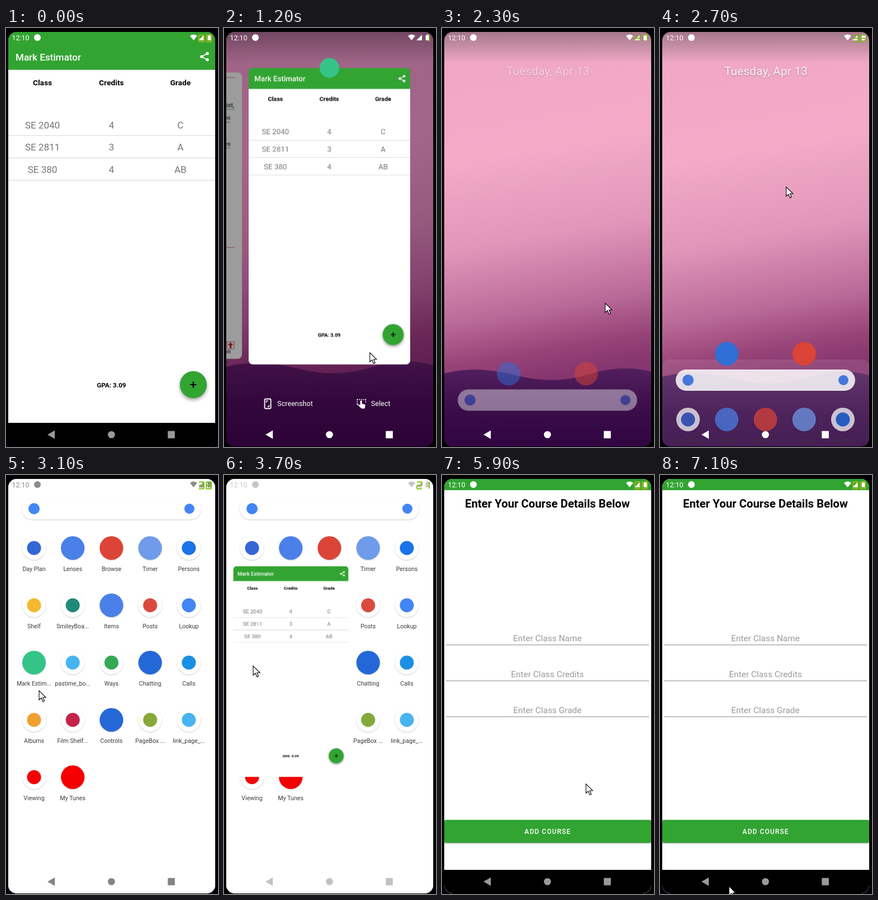
An HTML page that plays this animation: 378x746 px, repeating every 7.2 s.

```html
<!DOCTYPE html>
<html lang="en">
<head>
<meta charset="utf-8">
<title>Grade list</title>
<style>
  html, body { margin: 0; height: 100%; overflow: hidden; background: #000; }
  svg { display: block; width: 378px; height: 746px; }
  text { font-family: Roboto, sans-serif; white-space: pre; }
  .mid { text-anchor: middle; }
  .bold { font-weight: 700; }
  .row { font-size: 17px; fill: #757575; }
  .head { font-size: 13.7px; }
  .hint { font-size: 15.4px; fill: #9a9a9a; }
  .link { font-size: 11px; font-weight: 500; fill: #3a3a3a; }
  .para { font-size: 10.7px; font-weight: 500; fill: #3a3a3a; }
  .act { font-size: 12.6px; fill: #fff; }
  .app { font-size: 10.6px; fill: #3c3c3c; }
  .soft { filter: drop-shadow(0 1px 1px #0005); }
  .faint { filter: drop-shadow(0 1px 1px #0003); }
  .lift { filter: drop-shadow(0 3px 3px #0006); }
</style>
</head>
<body>
<svg viewBox="0 0 378 746">
  <defs>
    <linearGradient id="sky" gradientUnits="userSpaceOnUse" x1="110" y1="0" x2="215" y2="620">
      <stop offset="0" stop-color="#eea6c4"/>
      <stop offset=".35" stop-color="#f3abc8"/>
      <stop offset=".6" stop-color="#e096b9"/>
      <stop offset=".8" stop-color="#ba6a98"/>
      <stop offset=".92" stop-color="#974378"/>
      <stop offset="1" stop-color="#85366e"/>
    </linearGradient>
    <linearGradient id="hill" x2="0" y2="1">
      <stop offset="0" stop-color="#521f5e"/>
      <stop offset=".5" stop-color="#3a0c4a"/>
      <stop offset="1" stop-color="#2f0440"/>
    </linearGradient>
    <linearGradient id="shade" x2="0" y2="1">
      <stop offset="0" stop-color="#333" stop-opacity=".4"/>
      <stop offset="1" stop-color="#333" stop-opacity="0"/>
    </linearGradient>
    <clipPath id="screen"><rect x="4" y="7" width="369" height="738" rx="15"/></clipPath>
    <clipPath id="body"><rect x="4" y="27" width="369" height="676" rx="9"/></clipPath>
    <clipPath id="card"><rect x="44" y="71" width="288" height="526" rx="8"/></clipPath>
  </defs>

  <g clip-path="url(#screen)">
    <path d="M0 0H378V746H0Z" fill="url(#sky)"/>
    <path id="hills" d="M4 603Q60 588 130 606T260 605T373 600V746H4Z" fill="url(#hill)"/>
    <path d="M0 7H378V62H0Z" fill="url(#shade)"/>

    <g id="home">
      <text class="mid soft" x="189" y="84" font-size="20.6" letter-spacing=".25" fill="#fff" opacity=".9">Tuesday, Apr 13</text>
    </g>
    <path id="white" d="M0 0H378V746H0Z" fill="#fff"/>
    <g id="drawer">
      <rect id="sheet" x="4" y="23" width="369" height="760" rx="12" fill="#fff"/>
      <g id="dock">
        <circle cx="119" cy="13" r="21" fill="#2f6fd6"/>
        <circle cx="257" cy="13" r="21" fill="#db4437"/>
      </g>
      <g id="bar">
        <rect class="faint" x="28" y="41" width="320" height="38" rx="19" fill="#fff"/>
        <circle cx="50" cy="60" r="10" fill="#4285f4"/>
        <circle cx="327" cy="60" r="9" fill="#4285f4"/>
      </g>
      <g id="grid"></g>
    </g>

    <g id="recents">
      <path d="M0 0H378V746H0Z" fill="#280028" opacity=".4"/>
      <g id="third" clip-path="url(#card)">
        <path d="M44 71H332V597H44Z" fill="#fff"/>
        <path d="M44 190H332M44 248H332" stroke="#ccc"/>
        <g fill="none" stroke="#222" stroke-width="1.7"><circle cx="314" cy="87" r="3.8"/><path d="M317 90l5 5"/></g>
        <path d="M44 71H332V597H44Z" opacity=".39"/>
      </g>
      <g id="page" clip-path="url(#card)">
        <path d="M44 71H332V597H44Z" fill="#fff"/>
        <path d="M57 80.5H319M57 392.5H319" stroke="#d9777c"/>
        <g id="links"></g>
        <text x="57" y="432" font-size="20" font-weight="800" fill="#c5111b" style="font-family:Inter,sans-serif">Bureau of Learning</text>
        <g font-style="italic">
          <text class="para" x="57" y="465">Main Office: Meadow Annexe, MA-135</text>
          <text class="para" x="57" y="488">Voice: (300) 555-0142</text>
        </g>
        <text class="para" x="57" y="518">The regulations and policies of KZWU include only</text>
        <text class="para" x="57" y="541">those that are necessary to the proper organization</text>
        <text class="para" x="57" y="564">and operation of the university. KZWU reserves the</text>
        <text class="para" x="57" y="587">right to change the rules governing admission, tuition</text>
        <path d="M304.500 565.500h13v14h-13Z" fill="#fff" stroke="#c9666b"/>
        <path d="M311 567l5 5h-3.500v6h-3v-6h-3.500Z" fill="#c5111b"/>
        <path id="dim" d="M44 71H332V597H44Z" opacity=".39"/>
      </g>
      <g fill="none" stroke="#fff" stroke-width="1.8">
        <rect x="72.500" y="660.500" width="11" height="17" rx="1.500"/>
        <path d="M75.500 667v-3h3M80.500 671v3h-3" stroke-width="1.300"/>
        <path d="M237 661.500H253M237 670.500H241M237.500 661V671M252.500 661V667" stroke-dasharray="2 1.500" stroke-width="1.500"/>
      </g>
      <path d="M243 664q1.500-1.500 3 0v5l6 1.500-1 7h-6l-6-6 1-1 3 1Z" fill="#fff"/>
      <text class="act" x="95" y="673">Screenshot</text>
      <text class="act" x="262" y="673">Select</text>
    </g>

    <g id="bars">
      <path d="M0 0H378V40H0Z" fill="#32a432"/>
      <path d="M0 680H378V703H0Z" fill="#fff"/>
      <path d="M0 703H378V746H0Z"/>
    </g>
    <g id="win">
      <g clip-path="url(#body)">
        <path d="M4 27H373V703H4Z" fill="#fff"/>
        <path d="M4 27H373V74.500H4Z" fill="#32a432"/>
        <text x="17" y="57.500" font-size="17" font-weight="500" fill="#fff">Mark Estimator</text>
        <path d="M359 45.500L349 51L359 56.500" fill="none" stroke="#fff" stroke-width="1.700"/>
        <g fill="#fff"><circle cx="359" cy="45.500" r="2.700"/><circle cx="349" cy="51" r="2.700"/><circle cx="359" cy="56.500" r="2.700"/></g>
        <g id="table"></g>
        <text class="mid bold" x="188" y="640" font-size="11.700">GPA: 3.09</text>
        <circle class="lift" cx="334" cy="635" r="24" fill="#32a432"/>
        <path d="M328.500 635h11M334 629.500v11" stroke="#000" stroke-width="2.200"/>
      </g>
    </g>
    <circle id="badge" cx="188" cy="71" r="17.500" fill="#35c487"/>
    <circle id="badge2" cx="188" cy="71" r="18.500" fill="#db4437"/>

    <g id="add">
      <path d="M4 27H373V703H4Z" fill="#fff"/>
      <text class="mid bold" x="188" y="57.500" font-size="20.300">Enter Your Course Details Below</text>
      <text class="mid hint" x="188" y="296">Enter Class Name</text>
      <text class="mid hint" x="188" y="360">Enter Class Credits</text>
      <text class="mid hint" x="188" y="424">Enter Class Grade</text>
      <path d="M7 302.500H369M7 366.500H369M7 430.500H369" stroke="#8c8c8c"/>
      <rect class="soft" x="4" y="614" width="369" height="41" rx="3" fill="#32a432"/>
      <text class="mid" x="188.500" y="639" font-size="12" font-weight="500" letter-spacing="1.070" fill="#fff">ADD COURSE</text>
    </g>

    <g id="status" fill="currentColor">
      <text x="10.500" y="21.500" font-size="12.500">12:10</text>
      <circle cx="56" cy="17" r="6"/>
      <path d="M328 14q6.500-5 13 0l-6.500 8ZM343 22l10-10v10ZM359.500 13h2v-1.500h3v1.500h2v9h-7Z"/>
    </g>
    <g id="fps" fill="none" stroke-width="1.800"></g>
    <g id="nav" fill="currentColor">
      <path d="M74 724l13-7.500v15ZM288.500 717.500h12.500v13h-12.500Z"/>
      <circle cx="188" cy="724" r="6.300"/>
    </g>
  </g>
  <path id="cursor" d="M0 0V16.500L4 13L6.800 19.500L9.500 18.300L6.800 12H12Z" fill="#fff" stroke="#000" stroke-width="1.100"/>
</svg>

<script>
const LOOP = 7200, TICK = 100;
const $ = id => document.getElementById(id);
const fill = (id, html) => $(id).insertAdjacentHTML('beforeend', html);

// Table of courses
const cols = [65, 188, 311];
const cells = (list, y, cls) => list.map((s, i) =>
  `<text class="mid ${cls}" x="${cols[i]}" y="${y}">${s}</text>`).join('');
fill('table', cells(['Class', 'Credits', 'Grade'], 102, 'bold head'));
[['SE 2040', 4, 'C'], ['SE 2811', 3, 'A'], ['SE 380', 4, 'AB']].forEach((r, i) => {
  const y = 178.5 + i * 39.8;
  fill('table', cells(r, y, 'row') +
    `<path d="M4 ${y + 13}H373" stroke="#dadada" stroke-width="1.2"/>`);
});

// Link columns; a leading star starts a bullet
const linkColumn = (x, lines) => lines.forEach((line, i) => {
  const y = 111 + i * 23.75, text = line.replace('*', '');
  if (line[0] === '*') fill('links', `<circle cx="${x - 7}" cy="${y - 4}" r="1.8" fill="#333"/>`);
  fill('links', `<text class="link" x="${x}" y="${y}">${text}</text>`);
  const w = $('links').lastElementChild.getComputedTextLength();
  fill('links', `<path d="M${x} ${y + 4}h${w}" stroke="${i % 3 ? '#4f9fc4' : '#58b59c'}"/>`);
});
linkColumn(77, ['*Student Integrity', '*Student Complaint', 'Policy and', 'Procedures',
  '*Research with Hu-', 'man Participants', '*General Academic', 'Policies',
  '*Transfer Credit', '*Registration and', 'Course-Related', 'Policies']);
linkColumn(200, ['*Grades and Grading', '*Dean’s List, Honor’s List,', 'Probation, Suspension',
  '*Graduation Require-', 'ments and Procedures', '*Minors', '*Certificates']);

// Launcher grid: label, colour, and 1 for a fully coloured disc
[['Day Plan', '#3367d6'], ['Lenses', '#4a80e8', 1], ['Browse', '#db4437', 1], ['Timer', '#6f9bea', 1], ['Persons', '#1a73e8'],
 ['Shelf', '#f4b92e'], ['SmileyBoa...', '#1f8a78'], ['Items', '#4a80e8', 1], ['Posts', '#d94a3d'], ['Lookup', '#4285f4'],
 ['Mark Estim...', '#35c487', 1], ['pastime_bo...', '#47b4f0'], ['Ways', '#34a853'], ['Chatting', '#2468d8', 1], ['Calls', '#1a8fe3'],
 ['Albums', '#f0a030'], ['Film Shelf...', '#c2244b'], ['Controls', '#2468d8', 1], ['PageBox ...', '#86a83a'], ['link_page_...', '#47b4f0'],
 ['Viewing', '#f40000'], ['My Tunes', '#f40000', 1]
].forEach(([label, color, full], i) => {
  const x = 50 + i % 5 * 69, y = 130 + Math.floor(i / 5) * 102;
  fill('grid', `<circle class="faint" cx="${x}" cy="${y}" r="21" fill="${full ? color : '#fff'}"/>` +
    (full ? '' : `<circle cx="${x}" cy="${y}" r="12.5" fill="${color}"/>`) +
    `<text class="mid app" x="${x}" y="${y + 41}">${label}</text>`);
});

// Motion: keys are [ms, style], sampled ten times a second
function move(el, ...keys) {
  keys = [[0, keys[0][1]], ...keys, [LOOP, keys[keys.length - 1][1]]];
  el.animate(keys.map(([ms, style], i) => {
    const n = i + 1 < keys.length ? (keys[i + 1][0] - ms) / TICK : 0;
    return { ...style, offset: ms / LOOP, easing: n > 0 ? `steps(${n})` : 'linear' };
  }), { duration: LOOP, iterations: Infinity });
}
const at = (x, y, s = 1, opacity = 1) =>
  ({ transform: `translate(${x}px, ${y}px) scale(${s})`, opacity });
const fade = (id, ...keys) => move($(id), ...keys.map(([ms, opacity]) => [ms, { opacity }]));
const tint = (id, ...keys) => move($(id), ...keys.map(([ms, color]) => [ms, { color }]));

const card = (dy, o = 1) => at(40.9, 50.2 + dy, .7805, o);
const icon = o => at(29.3, 295, .11, o);
move($('win'), [500, at(0, 0)], [900, card(0)], [1300, card(0)], [1600, card(-240)],
  [1700, card(-560, 0)], [3500, icon(0)], [3500, icon(1)], [3900, at(0, 0)]);
fade('bars', [500, 1], [600, 0], [3800, 0], [3900, 1]);
move($('badge'), [700, at(0, 0, 1, 0)], [900, at(0, 0)], [1300, at(0, 0)],
  [1600, at(0, -240)], [1700, at(0, -560, 1, 0)]);
fade('badge2', [1700, 0], [1900, 1], [2100, 1], [2300, 0]);

const side = x => at(x, 10.15, .9696);
move($('page'), [500, side(-400)], [900, side(-289.9)], [1600, side(-289.9)], [1800, at(0, 0)]);
move($('third'), [1600, side(-585)], [1800, side(-289.9)]);
fade('dim', [1600, .39], [1800, 0]);
fade('recents', [400, 0], [600, 1], [2100, 1], [2300, 0]);

move($('hills'), [2100, at(0, 0)], [2400, at(0, 18)]);
fade('home', [2200, 0], [2400, 1], [2700, 1], [2900, 0]);
move($('drawer'), [2200, at(0, 610, 1, 0)], [2400, at(0, 595)], [2500, at(0, 595)],
  [2700, at(0, 567)], [2900, at(0, 150)], [3000, at(0, 0)]);
fade('sheet', [2500, 0], [2700, .1], [2900, .85], [3000, 1]);
fade('white', [2800, 0], [3000, 1]);
fade('dock', [2700, 1], [2900, 0]);
fade('bar', [2700, .84], [3000, 1]);
fade('grid', [2500, 0], [2700, .72], [2900, 1]);

move($('add'), [4900, at(0, 60, 1, 0)], [5200, at(0, 0)]);
tint('status', [2800, '#fff'], [3000, '#8c8c8c'], [3600, '#8c8c8c'], [3800, '#fff']);
tint('nav', [400, '#9a9a9a'], [600, '#fff'], [2800, '#fff'], [3000, '#858585'],
  [3600, '#858585'], [3800, '#fff'], [5500, '#fff'], [5700, '#9a9a9a']);

move($('cursor'), ...[
  [0, 302, 770], [300, 302, 770], [500, 294, 724], [700, 294, 724], [1200, 260, 578],
  [1300, 259, 540], [1600, 284, 300], [1900, 327, 379], [2000, 346, 380], [2200, 346, 380],
  [2400, 236, 600], [2500, 234, 560], [2700, 225, 283], [2800, 215, 250], [3100, 59, 384],
  [3300, 52, 340], [3700, 52, 340], [4400, 207, 642], [4700, 332, 637], [5000, 332, 637],
  [5600, 290, 530], [6500, 190, 590], [7100, 123, 732]
].map(([ms, x, y]) => [ms, at(x, y)]));

// Frame-rate counter in seven-segment digits
const segs = { a: 'M0 0h9', b: 'M9 0v6', c: 'M9 6v6', d: 'M0 12h9', e: 'M0 6v6', f: 'M0 0v6', g: 'M0 6h9' };
const lit = ['abcdef', 'bc', 'abged', 'abgcd', 'fgbc', 'afgcd', 'afgedc', 'abc', 'abcdefg', 'abcdfg'];
const rates = [[0, '00'], [600, '24'], [1000, ' 1'], [1400, '42'], [1800, '59'], [2300, '47'],
  [2600, '36'], [3000, '38'], [3600, '21'], [4200, '10'], [4700, '00'], [LOOP]];
rates.slice(0, -1).forEach(([start, text], i) => {
  const end = rates[i + 1][0], g = document.createElementNS('http://www.w3.org/2000/svg', 'g');
  g.setAttribute('stroke', /0/.test(text) ? '#a9b814' : '#7cbf12');
  g.innerHTML = [...text].map((ch, k) => ch === ' ' ? '' :
    `<path transform="translate(${344 + k * 13} 12.500)" d="${[...lit[ch]].map(s => segs[s]).join('')}"/>`).join('');
  $('fps').append(g);
  const show = o => ({ opacity: o });
  move(g, [0, show(start ? 0 : 1)], [start, show(start ? 0 : 1)], [start, show(1)],
    [end, show(1)], [end, show(end < LOOP ? 0 : 1)]);
});
</script>
</body>
</html>
```
